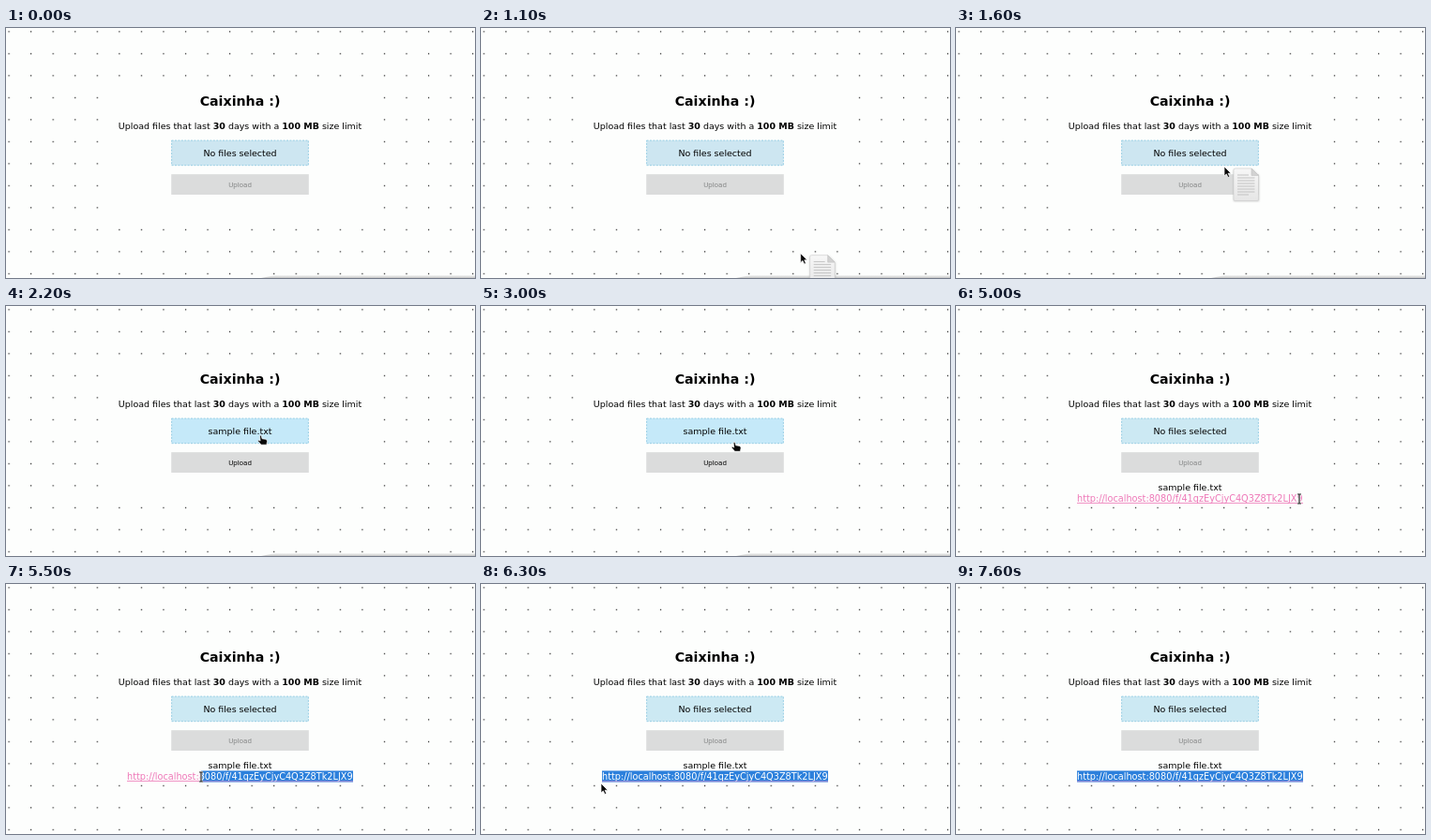
Write an HTML page that moves like this. It is 500 by 267 pixels and loops after 9000 ms.

```html
<!DOCTYPE html>
<html lang="en">
<head>
<meta charset="utf-8">
<title>Caixinha</title>
<style>
  html, body { margin: 0; width: 100%; height: 100%; overflow: hidden; background: #fdfefd; }
  svg { display: block; width: 100%; height: 100%; }
  text { font: 9.47px "DejaVu Sans", sans-serif; white-space: pre; }
  .mid { text-anchor: middle; }
  .title { font-size: 14.2px; font-weight: bold; }
  .button { font: 7.9px Roboto, sans-serif; }
  .link { font-size: 9.73px; font-kerning: none; }
  .bold { font-weight: bold; }
</style>
</head>
<body>
<svg viewBox="0 0 500 267">
  <defs>
    <pattern id="dots" x="2.5" y="3.3" width="23.55" height="23.5" patternUnits="userSpaceOnUse">
      <rect width="1.2" height="1.2" fill="#111"/>
    </pattern>
    <linearGradient id="edge" x2="0" y2="1">
      <stop stop-color="#ccc" stop-opacity="0"/>
      <stop offset="1" stop-color="#c4c4c4"/>
    </linearGradient>
    <linearGradient id="paper" x2="0" y2="1">
      <stop stop-color="#f7f7f7"/>
      <stop offset="1" stop-color="#e6e6e6"/>
    </linearGradient>
    <filter id="soft" x="-30%" y="-30%" width="160%" height="160%">
      <feGaussianBlur stdDeviation="1.2"/>
    </filter>
    <clipPath id="selected"><rect id="selectedArea" y="199.3" height="12.4"/></clipPath>
  </defs>

  <rect width="500" height="267" fill="#fdfefd"/>
  <rect width="500" height="267" fill="url(#dots)"/>
  <rect x="100" y="57" width="300" height="145" fill="#fdfefd"/>
  <path id="shadow" d="M272 267L290 263.5H500V267Z" fill="url(#edge)"/>

  <text class="mid title" x="249.5" y="83">Caixinha :)</text>
  <text class="mid" x="249.5" y="107.8">Upload files that last <tspan class="bold">30</tspan> days with a <tspan class="bold">100 MB</tspan> size limit</text>

  <rect id="drop" x="176.6" y="120.1" width="145.8" height="26.6" stroke="#8fcbe2" stroke-width=".9" stroke-dasharray="2 1.4"/>
  <text id="dropText" class="mid" x="249.5" y="137"></text>
  <rect x="176.2" y="156.2" width="146.6" height="21.8" fill="#dbdcdc"/>
  <text id="upload" class="mid button" x="249.5" y="170.3">Upload</text>

  <g id="result">
    <text class="mid" x="249.5" y="196.6">sample file.txt</text>
    <g id="link" fill="#ee78b8">
      <text class="link" x="129" y="209">http://localhost:8080/f/41qzEyCjyC4Q3Z8Tk2LJX9</text>
      <rect x="129" y="210.2" width="241" height=".8"/>
    </g>
    <g clip-path="url(#selected)">
      <rect x="129" y="199.3" width="241" height="12.4" fill="#2c80dc"/>
      <text class="link" x="129" y="209" fill="#fff">http://localhost:8080/f/41qzEyCjyC4Q3Z8Tk2LJX9</text>
      <rect x="129" y="210.4" width="241" height=".8" fill="#c98bd0"/>
    </g>
  </g>

  <g id="pointer">
    <g id="file">
      <path d="M10 3H30L37 10V37H10Z" fill="#777" opacity=".45" filter="url(#soft)"/>
      <path d="M12 2H29L36.5 9.5V35Q36.5 36.5 35 36.5H11.500Q10 36.500 10 35V4Q10 2 12 2Z" fill="url(#paper)" stroke="#cfcfcf" stroke-width=".6"/>
      <path d="M29 2V9.500H36.500Z" fill="#d2d2d2" stroke="#bbb" stroke-width=".5"/>
      <path d="M14 9H26M14 12H32.500M14 15H32.500M14 18H32.500M14 21H32.500M14 24H32.500M14 27H32.500M14 30H26" stroke="#c2c2c2" stroke-width="1"/>
    </g>
    <path id="arrow" d="M0 0V10L2.300 7.900L4 11.500L5.700 10.700L4.100 7.200H7.200Z" fill="#080808" stroke="#fff" stroke-width=".7"/>
    <g id="denied" fill="none">
      <circle cx="6.500" cy="6.500" r="3.400" fill="#fff" stroke="#111" stroke-width="1.400"/>
      <path d="M4.200 4.200L8.800 8.800" stroke="#111" stroke-width="1.300"/>
    </g>
    <path id="hand" d="M-.9 .2Q0 -.7 .9 .2L1.600 3.300L5.400 3.900Q7.200 4.300 7.100 6L6.500 9.800H.6L-2.800 5.800Q-2.800 4.700 -1.600 4.900L-.3 5.700Z" fill="#080808" stroke="#fff" stroke-width=".7"/>
    <g id="ibeam" fill="none">
      <path d="M-2 -5H2M0 -5V5M-2 5H2" stroke="#fff" stroke-width="2.600"/>
      <path d="M-2 -5H2M0 -5V5M-2 5H2" stroke="#222" stroke-width="1.200"/>
    </g>
  </g>
</svg>
<script>
  const LOOP = 9000, STEP = 100;
  const LINK = { left: 129, right: 370 };
  const DROPPED = 2100, UPLOADED = 3500, SELECTING = 5100;

  // time, x, y of the pointer's hot spot
  const path = [
    [1000, 348, 258], [1300, 326, 206], [1500, 301, 165], [1600, 286, 148],
    [1900, 272, 136], [2400, 271, 140], [2900, 271, 144], [3000, 270, 145.500],
    [3300, 269, 167], [3900, 269, 167], [4100, 278, 174], [4500, 340, 198],
    [4800, 375, 207], [5000, 366, 206], [5100, 366, 206], [5700, 129, 206],
    [5800, 128, 213], [6300, 128, 213], [6700, 152, 217], [7200, 188, 204],
    [7400, 213, 232], [7500, 229, 253]
  ];

  // time from which each set of pointer shapes shows
  const shapes = [
    [0], [1000, "arrow", "file"], [DROPPED, "hand"], [UPLOADED, "arrow", "denied"],
    [4200, "arrow"], [4900, "ibeam"], [5800, "arrow"], [7600]
  ];

  const el = id => document.getElementById(id);
  const show = (id, on) => el(id).setAttribute("visibility", on ? "inherit" : "hidden");
  const lerp = (a, b, k) => a + (b - a) * k;

  function pointerAt(t) {
    const i = path.findIndex(p => p[0] > t);
    if (i === 0) return path[0].slice(1);
    if (i < 0) return path[path.length - 1].slice(1);
    const [t0, x0, y0] = path[i - 1], [t1, x1, y1] = path[i];
    const k = (t - t0) / (t1 - t0);
    return [lerp(x0, x1, k), lerp(y0, y1, k)];
  }

  function render(t) {
    const [x, y] = pointerAt(t);
    const fileReady = t >= DROPPED && t < UPLOADED;
    const done = t >= UPLOADED;

    el("pointer").setAttribute("transform", `translate(${x} ${y})`);
    const active = shapes.filter(s => s[0] <= t).pop();
    for (const id of ["file", "arrow", "denied", "hand", "ibeam"]) show(id, active.includes(id));

    const hovered = fileReady && y < 147;
    el("drop").setAttribute("fill", hovered ? "#c5e9f9" : done ? "#cce9f3" : "#cde6f1");
    el("dropText").textContent = fileReady ? "sample file.txt" : "No files selected";
    el("upload").setAttribute("fill", fileReady ? "#111" : "#898b8b");
    show("shadow", !done);
    show("result", done);

    let start = LINK.right;
    if (t >= 5800) start = LINK.left;
    else if (t >= SELECTING) start = x;
    el("selectedArea").setAttribute("x", start);
    el("selectedArea").setAttribute("width", LINK.right - start);
  }

  const origin = performance.now();
  function tick() {
    const t = (performance.now() - origin) % LOOP;
    render(Math.floor(t / STEP) * STEP);
    requestAnimationFrame(tick);
  }
  tick();
</script>
</body>
</html>
```
